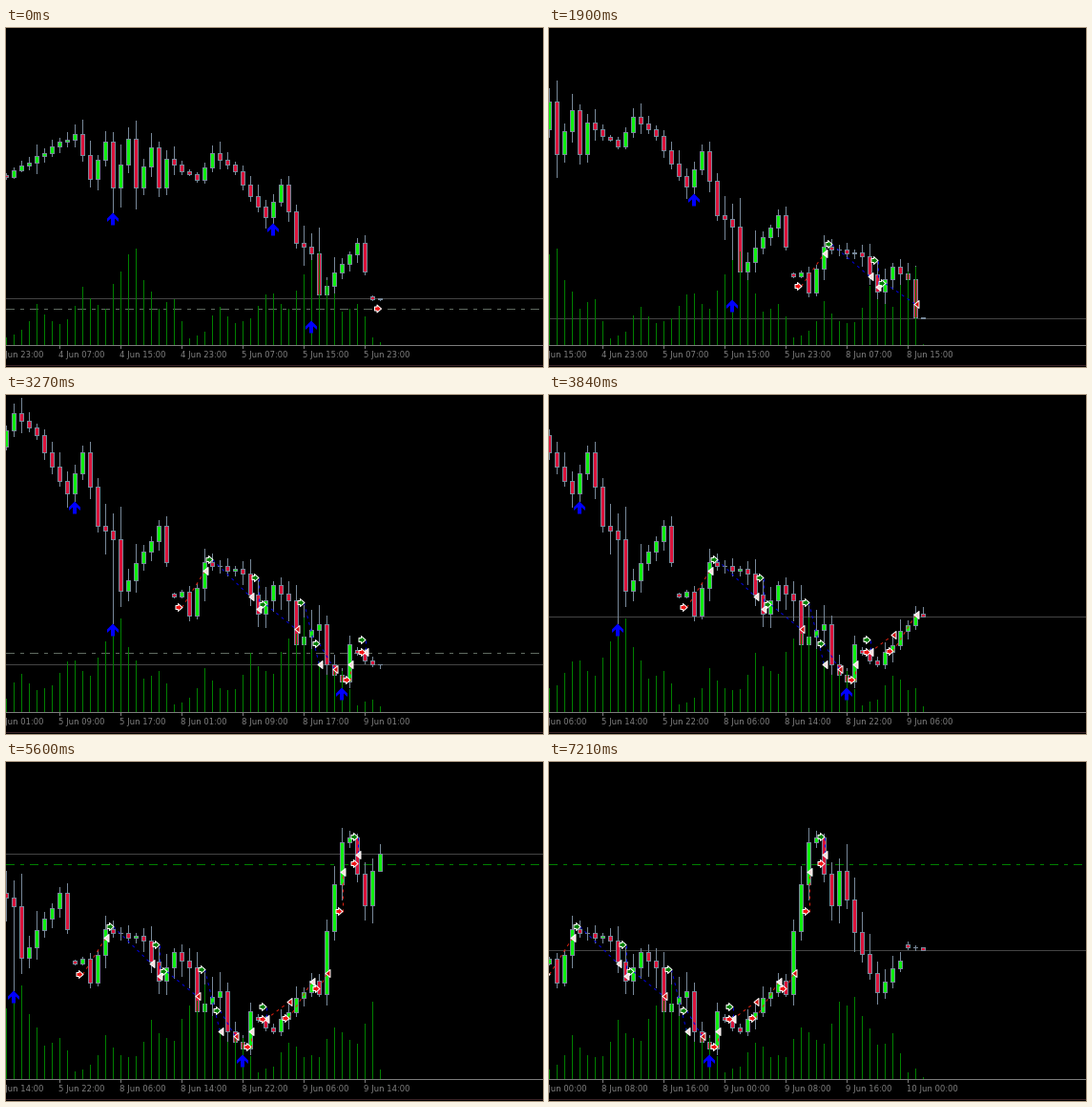
Write a matplotlib script that moves like this. It is 563 px wide and 355 px high and loops after 7.26 s.

```python
import numpy as np
import matplotlib.pyplot as plt
from matplotlib.animation import FuncAnimation
from matplotlib.collections import LineCollection, PolyCollection

W, H, FRAMES, LOOP = 563, 355, 153, 7260
LAST_X, STEP, BASE, SPAN = 392, 8, 332, 49
GREEN, SLATE, DIM = "#008000", "#778899", "#5f6a60"
UP, DOWN = "#10f010", "#dc143c"
PX = 0.72  # one pixel in points at 100 dpi

# Turning points of the price: hour, height on screen at full zoom
SWINGS = [(-49, 50), (-43, 10), (-40, -6), (-38, 52), (-36, 3), (-35, 64),
          (-33, 0), (-32, 64), (-30, 11), (-29, 64), (-28, 26), (-24, 54),
          (-22, 19), (-19, 42), (-15, 103), (-13, 60), (-11, 137), (-9, 151),
          (-8, 205), (-3, 137), (-1, 211), (0, 206), (1, 231), (3, 175),
          (8, 187), (10, 229), (12, 199), (14, 215), (15, 261), (18, 240),
          (19, 282), (21, 300), (22, 261), (25, 282), (30, 229), (31, 243),
          (32, 177), (34, 84), (35, 79), (37, 150), (38, 114), (40, 178),
          (43, 241), (47, 194), (49, 193)]
# Buy signals: hour, low of that hour
SIGNALS = [(-35, 97), (-14, 111), (-9, 239), (21, 306)]
# Entry time and level, exit time and level
TRADES = [(0.2, 222, 3.5, 184), (4.2, 172, 9.5, 211), (10.2, 191, 10.8, 224),
          (11.6, 219, 15.5, 245), (16.2, 217, 18.7, 282),
          (18.8, 260, 20.5, 287), (22.2, 298, 22.5, 282),
          (24.2, 256, 24.6, 269), (24.7, 269, 27.5, 251),
          (27.6, 268, 30.7, 230), (31.5, 237, 32.5, 221),
          (34.2, 156, 34.5, 115), (36.1, 78, 36.4, 97), (36.6, 106, 99, 0)]
SIDES = "sbbBbBsbSsSsbs"  # sell or buy; a capital has a red exit mark

rng = np.random.default_rng(4)
hours = np.arange(-SPAN, SPAN + 1)
N = len(hours)

# Trading activity follows the time of day
V = np.interp((hours + 1) % 24, [0, 2, 4, 6, 8, 10, 13, 15, 17, 20, 22, 24],
              [7, 14, 42, 23, 25, 56, 36, 79, 92, 36, 46, 8])
V *= rng.uniform(0.88, 1.12, N)

turn_h, turn_y = zip(*SWINGS)
C = np.interp(hours, turn_h, turn_y)
C += np.where(np.isin(hours, turn_h), 0, rng.uniform(-3, 3, N))
O = np.r_[C[0] - 6, C[:-1]]
midnight = (hours + 1) % 24 == 0
O[midnight] = C[midnight] - 3

# Busy hours have longer wicks
HI = np.minimum(O, C) - V * rng.uniform(0.1, 0.4, N)
LO = np.maximum(O, C) + V * rng.uniform(0.1, 0.35, N)
for i, y in SIGNALS:
    LO[i + SPAN] = y

# Replay speed is steady in ticks, so busy hours take longer
START = np.r_[0, np.cumsum(V[SPAN:])]
CLOCK = np.arange(len(START))
PACE_K = [0, 22, 56, 80, 95, 118, 151]
PACE_T = np.interp([0.29, 11.3, 20.06, 31.26, 34.7, 39.13, 49.1], CLOCK, START)


def forming(j, f):
    """High, low and price of candle j after the fraction f of its ticks."""
    if C[j] < O[j]:
        t, y = [0, 0.15, 0.7, 1], [O[j], LO[j], HI[j], C[j]]
    else:
        t, y = [0, 0.06, 0.5, 1], [O[j], HI[j], LO[j], C[j]]
    now = np.interp(f, t, y)
    seen = [b for a, b in zip(t, y) if a <= f] + [now]
    return min(seen), max(seen), now


def hour_label(i):
    day, h = divmod(i + 1, 24)
    return f"{day + (8 if i >= -1 else 6)} Jun {h:02d}:00"


def rect(x0, y0, x1, y1):
    return [(x0, y0), (x1, y0), (x1, y1), (x0, y1)]


def place(shape, x, y):
    return np.array(shape) + (x + 0.5, y + 0.5)


UP_ARROW = [(0, -7), (6, -1), (6, 2.5), (2, -1), (2, 6), (-2, 6), (-2, -1),
            (-6, 2.5), (-6, -1)]
ENTRY = [(-3.5, -2), (-1, -2), (-1, -4), (3.5, 0), (-1, 4), (-1, 2), (-3.5, 2)]
EXIT = [(-2.5, 0), (2.5, -4), (2.5, 4)]

fig = plt.figure(figsize=(W / 100, H / 100), dpi=100, facecolor="black")
ax = fig.add_axes([0, 0, 1, 1])
ax.set_xlim(0, W)
ax.set_ylim(H, 0)
ax.axis("off")


def polys(z, color="none", edge="none", smooth=False):
    return ax.add_collection(PolyCollection(
        [], facecolors=color, edgecolors=edge, linewidths=PX,
        antialiaseds=smooth, zorder=z), autolim=False)


def dashes(z, color, pattern, smooth=False):
    return ax.add_collection(LineCollection(
        [], colors=color, linewidths=PX, linestyles=[(0, pattern)],
        antialiaseds=smooth, zorder=z), autolim=False)


bid = polys(1, "#444444")
held = dashes(1, DIM, (9, 6, 3, 6))
wicks = polys(2, SLATE)
outlines = polys(3, SLATE)
bodies = polys(4)
bars = polys(5, GREEN)
buy_path = dashes(6, "#0000e0", (3, 4), True)
sell_path = dashes(6, "#e02010", (3, 4), True)
exits = polys(7, edge="white", smooth=True)
entries = polys(8, edge="white", smooth=True)
signals = polys(9, "#0000ff", smooth=True)

TICKS = range(-8, 400, 64)
polys(10, "#7c7c7c").set_verts(
    [rect(0, BASE, W, BASE + 1)] + [rect(x, BASE, x + 1, BASE + 4) for x in TICKS])
polys(10, "#3a2226").set_verts([rect(0, 353, W, 354)])
labels = [ax.text(x - 1, 345.3, "", color="#808080", family="DejaVu Sans",
                  size=8.5 * PX, va="baseline", zorder=10) for x in TICKS]


def draw(k):
    p = np.interp(np.interp(k, PACE_K, PACE_T), START, CLOCK)
    s = int(p)

    view = slice(s, s + SPAN + 1)
    o, c, hi, lo, v = (a[view].copy() for a in (O, C, HI, LO, V))
    hi[-1], lo[-1], c[-1] = forming(s + SPAN, p - s)
    v[-1] *= p - s

    # The chart rescales as old peaks leave and new lows come in
    keys = [0, 11, 14, 16, 20, 21, 23]
    zoom = np.interp(s, keys, [0.794, 0.804, 0.83, 0.869, 0.869, 0.95, 1])
    floor = np.interp(s, keys, [239, 240, 242, 264, 282, 300, 306])

    def Y(y):
        return np.rint(306 + zoom * (y - floor))

    def X(t):
        return LAST_X + STEP * (int(np.floor(t)) - s)

    xs = np.arange(SPAN + 1) * STEP
    top, bot = Y(np.minimum(o, c)), Y(np.maximum(o, c))
    wicks.set_verts([rect(x, a, x + 1, b + 1) for x, a, b in zip(xs, Y(hi), Y(lo))])
    outlines.set_verts([rect(x - 2, a, x + 3, b + 1) for x, a, b in zip(xs, top, bot)])
    solid = bot - top > 1
    bodies.set_verts([rect(x - 1, a + 1, x + 2, b)
                      for x, a, b in zip(xs[solid], top[solid], bot[solid])])
    bodies.set_facecolor([UP if u else DOWN for u in (c < o)[solid]])
    bars.set_verts([rect(x, BASE - round(h), x + 1, BASE) for x, h in zip(xs, v)])

    now = Y(c[-1])
    bid.set_verts([rect(0, now, W, now + 1)])

    line, paths, ins, outs = [], {"b": [], "s": []}, [], []
    for (t0, y0, t1, y1), side in zip(TRADES, SIDES):
        if t0 > p:
            continue
        kind = side.lower()
        a = (X(t0), Y(y0))
        ins.append((place(ENTRY, a[0] - 3, a[1]), GREEN if kind == "b" else "#f01414"))
        if t1 > p:
            line.append([(0, a[1] + 0.5), (W, a[1] + 0.5)])
            held.set_color(GREEN if t0 > 36 else DIM)
            continue
        b = (X(t1), Y(y1))
        paths[kind].append(np.array([a, b]) + 0.5)
        outs.append((place(EXIT, b[0] + 1, b[1]),
                     "#d01010" if side.isupper() else "#f4dcdc"))
    held.set_segments(line)
    buy_path.set_segments(paths["b"])
    sell_path.set_segments(paths["s"])
    for coll, marks in ((entries, ins), (exits, outs)):
        coll.set_verts([m for m, _ in marks])
        coll.set_facecolor([col for _, col in marks] or "none")

    signals.set_verts([place(UP_ARROW, X(i) - 0.5, Y(y) + 7)
                       for i, y in SIGNALS if i < s])
    for x, lab in zip(TICKS, labels):
        lab.set_text(hour_label(s + (x - LAST_X) // STEP))
    return []


anim = FuncAnimation(fig, draw, frames=FRAMES, interval=LOOP / FRAMES,
                     init_func=lambda: [], repeat=True, repeat_delay=0, blit=False)
plt.show()
```
